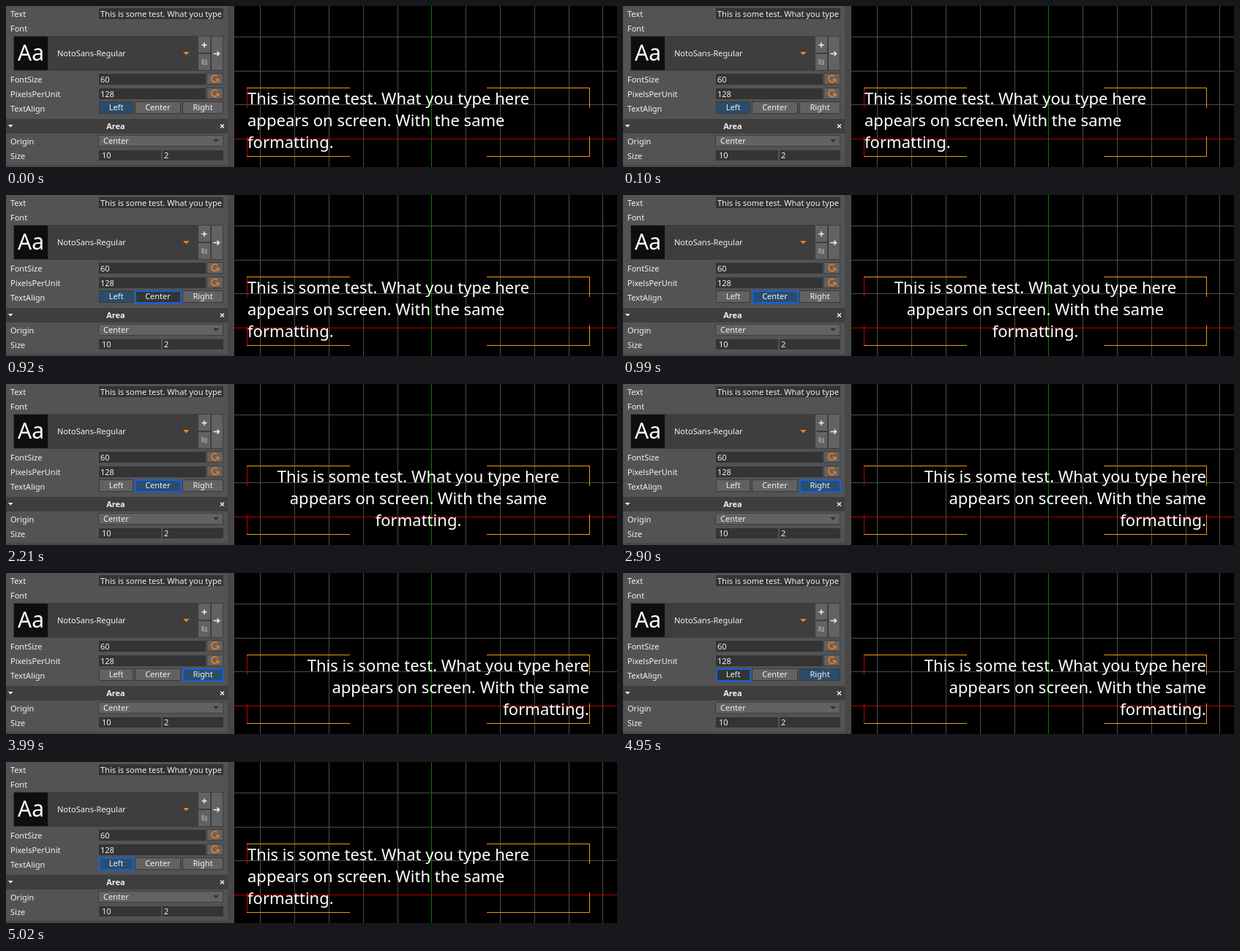
An HTML page for the animation above (5.78 s loop, 835 by 221 pixels).

```html
<!DOCTYPE html>
<html lang="en">
<head>
<meta charset="utf-8">
<title>Text alignment</title>
<style>
  html, body { margin: 0; width: 100%; height: 100%; overflow: hidden; background: #000; }
  svg { display: block; }
  rect, .line { shape-rendering: crispEdges; }
  text { font: 11px "Noto Sans", sans-serif; fill: #f2f2f2; white-space: pre; }
  .mid { text-anchor: middle; }
  .field { fill: #343434; }
  .button { fill: #626262; stroke: #3e3e3e; }
  .dark { fill: #3e3e3e; }
  .line { fill: none; stroke-width: 1; }
  .icon { fill: none; stroke: #f4f4f4; stroke-width: 1.4; }
  #scene text { font-size: 22.05px; fill: #fff; }
</style>
</head>
<body>
<svg width="835" height="221" viewBox="0 0 835 221">
  <defs>
    <clipPath id="fieldClip"><rect x="127" y="3" width="169" height="16"/></clipPath>
    <g id="reset">
      <rect class="button" x="0.5" y="0.5" width="22" height="15"/>
      <path d="M14.800 4.400A4.600 4.600 0 1 0 14.900 10.900" fill="none" stroke="#e97a26" stroke-width="1.8"/>
      <path d="M17.500 13V7.800H11.800Z" fill="#e97a26"/>
    </g>
  </defs>

  <rect width="303" height="221" fill="#535353"/>
  <rect x="303" width="9" height="221" fill="#474747"/>
  <rect y="155" width="303" height="20" class="dark"/>
  <rect y="218" width="303" height="3" fill="#484848"/>

  <text x="6" y="15">Text</text>
  <text x="6" y="35">Font</text>
  <text x="6" y="105">FontSize</text>
  <text x="6" y="125">PixelsPerUnit</text>
  <text x="6" y="145">TextAlign</text>
  <text x="6" y="190">Origin</text>
  <text x="6" y="210">Size</text>

  <rect class="field" x="127" y="3" width="170" height="15"/>
  <text x="129" y="15" clip-path="url(#fieldClip)">This is some test. What you type here</text>

  <rect class="dark" x="10" y="41" width="252" height="48"/>
  <rect x="11" y="42" width="46" height="46" fill="#0e0e0e"/>
  <text x="34" y="75" class="mid" style="font-size:30px;fill:#fff">Aa</text>
  <text x="70" y="69">NotoSans-Regular</text>
  <path d="M242 63h8.500l-4.250 4.300Z" fill="#f0861c"/>
  <rect class="button" x="262.500" y="41.500" width="17" height="23"/>
  <rect class="button" x="262.500" y="65.500" width="17" height="23"/>
  <rect class="button" x="280.500" y="41.500" width="16" height="47"/>
  <path class="icon" d="M267.500 53.500h7M271 50v7M283.500 65.500h8M288.500 62.500l3 3-3 3"/>
  <path d="M267 73h4v7h-4ZM272 74h3v7h-5v-1h2Z" fill="#8c8c8c"/>

  <rect class="field" x="127" y="93" width="146" height="15"/>
  <text x="129" y="105">60</text>
  <use href="#reset" x="274" y="92"/>
  <rect class="field" x="127" y="113" width="146" height="15"/>
  <text x="129" y="125">128</text>
  <use href="#reset" x="274" y="112"/>

  <g id="buttons"></g>

  <path d="M3 163h6.500l-3.250 3.500Z" fill="#fff"/>
  <text x="150" y="169" class="mid" style="font-weight:700">Area</text>
  <path class="icon" d="M293 162.500l5 5m0-5l-5 5"/>

  <rect class="button" x="126.500" y="177.500" width="170" height="15"/>
  <text x="133" y="189">Center</text>
  <path d="M283 183h8l-4 4Z" fill="#303030"/>
  <rect class="field" x="127" y="198" width="85" height="14"/>
  <rect class="field" x="214" y="198" width="83" height="14"/>
  <text x="131" y="209">10</text>
  <text x="216" y="209">2</text>

  <g id="scene">
    <path id="grid" class="line" stroke="#4c4c4c"/>
    <path class="line" stroke="#008000" d="M581.500 0V221"/>
    <path class="line" stroke="#b00000" d="M312 182.500H835"/>
    <g id="lines">
      <text y="135">This is some test. What you type here</text>
      <text y="165">appears on screen. With the same</text>
      <text y="195">formatting.</text>
    </g>
    <path class="line" stroke="#f09a10" d="M329 112.500H470M657 112.500H797.500V140M329 206.500H470M657 206.500H797.500V179"/>
    <path class="line" stroke="#c00000" d="M329.500 113V140M329.500 179V206"/>
  </g>
</svg>
<script>
  const LOOP = 5780, CELL = 46.8, AXIS_X = 581.4, AXIS_Y = 182.2;
  const NONE = -1;
  const options = [
    { label: "Left", x: 127, width: 47, textX: 330, anchor: "start" },
    { label: "Center", x: 176, width: 63, textX: 563.5, anchor: "middle" },
    { label: "Right", x: 241, width: 56, textX: 797, anchor: "end" }
  ];
  // start time, chosen option, pressed option, focused option
  const steps = [
    [0, 0, NONE, NONE],
    [920, 0, 1, 1],
    [990, 1, NONE, 1],
    [2800, 1, 2, 2],
    [2900, 2, NONE, 2],
    [4950, 2, 0, 0],
    [5020, 0, NONE, 0]
  ];
  const find = id => document.getElementById(id);

  let grid = "";
  for (let x = AXIS_X - 5 * CELL; x < 835; x += CELL) grid += `M${Math.round(x) + 0.5} 0V221`;
  for (let y = AXIS_Y - CELL; y > 0; y -= CELL) grid += `M312 ${Math.round(y) + 0.5}H835`;
  find("grid").setAttribute("d", grid);

  find("buttons").innerHTML = options.map(({ label, x, width }) => `<g>
    <rect class="frame" x="${x + 0.5}" y="131.5" width="${width - 1}" height="16"/>
    <text class="mid" x="${x + width / 2}" y="143">${label}</text></g>`).join("");
  const buttons = [...find("buttons").children];
  const lines = [...find("lines").children];

  function draw(time) {
    const t = time % LOOP;
    const [, chosen, pressed, focused] = steps.findLast(step => step[0] <= t);
    buttons.forEach((button, i) => {
      const face = button.firstElementChild;
      face.setAttribute("fill", i === pressed ? "#343434" : i === chosen ? "#2b4d6c" : "#626262");
      face.setAttribute("stroke", i === focused ? "#1060e0" : "#3a3a3a");
      face.setAttribute("stroke-width", i === focused ? 2 : 1);
    });
    for (const line of lines) {
      line.setAttribute("x", options[chosen].textX);
      line.setAttribute("text-anchor", options[chosen].anchor);
    }
  }

  const start = performance.now();
  function tick() {
    draw(performance.now() - start);
    requestAnimationFrame(tick);
  }
  tick();
</script>
</body>
</html>
```
